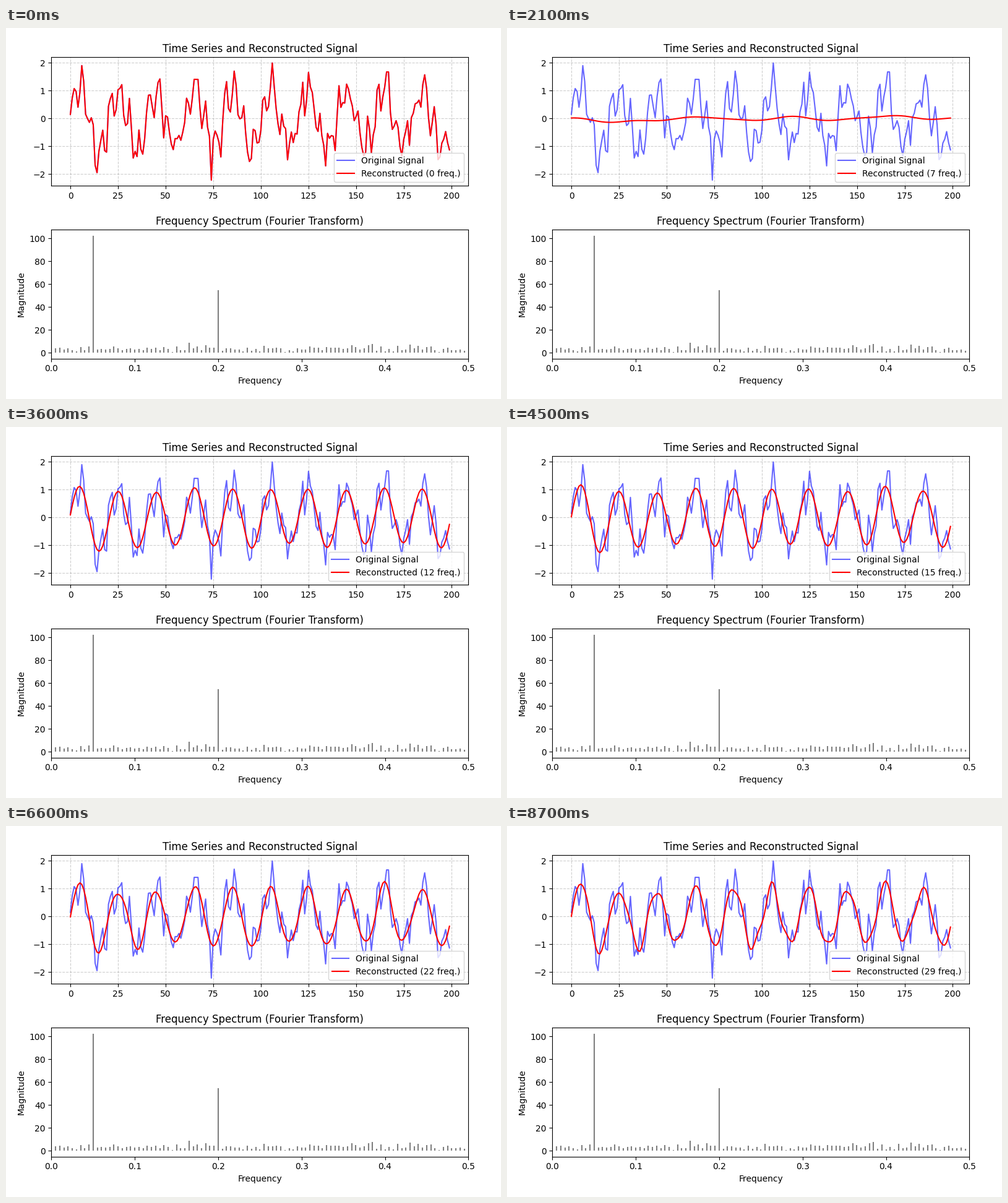
A matplotlib script for the animation above (9000 ms loop, 800 by 600 pixels).

```python
import matplotlib.pyplot as plt
import numpy as np
from matplotlib.animation import FuncAnimation

N = 200
FRAMES = 30
INTERVAL = 300

# Two sine waves with Gaussian noise
rng = np.random.RandomState(42)
t = np.arange(N)
signal = np.sin(2 * np.pi * 0.05 * t) + 0.5 * np.sin(2 * np.pi * 0.2 * t)
signal += 0.3 * rng.randn(N)

spectrum = np.fft.fft(signal)
freqs = np.fft.fftfreq(N)[:N // 2]
magnitude = np.abs(spectrum)[:N // 2]


def low_pass(count):
    """Rebuild the signal from its lowest bins; a count of 0 keeps all."""
    kept = spectrum.copy()
    kept[count:-count] = 0
    return np.fft.ifft(kept).real


def caption(count):
    return f"Reconstructed ({count} freq.)"


fig, (ax_time, ax_freq) = plt.subplots(2, 1, figsize=(8, 6), dpi=100)
fig.tight_layout(pad=3)

ax_time.set_title("Time Series and Reconstructed Signal")
ax_time.plot(t, signal, color="blue", alpha=0.6, label="Original Signal")
rebuilt, = ax_time.plot(t, signal, color="red", label=caption(0))
ax_time.grid(True, linestyle="--", alpha=0.6)
legend = ax_time.legend(loc="lower right")

ax_freq.set_title("Frequency Spectrum (Fourier Transform)")
ax_freq.vlines(freqs, 0, magnitude, color="gray")
ax_freq.set_xlim(0, 0.5)
ax_freq.set_xlabel("Frequency")
ax_freq.set_ylabel("Magnitude")


def update(count):
    rebuilt.set_ydata(low_pass(count))
    legend.get_texts()[1].set_text(caption(count))
    return rebuilt, legend


anim = FuncAnimation(fig, update, frames=FRAMES, interval=INTERVAL,
                     repeat=True, repeat_delay=0, blit=False)
plt.show()
```
